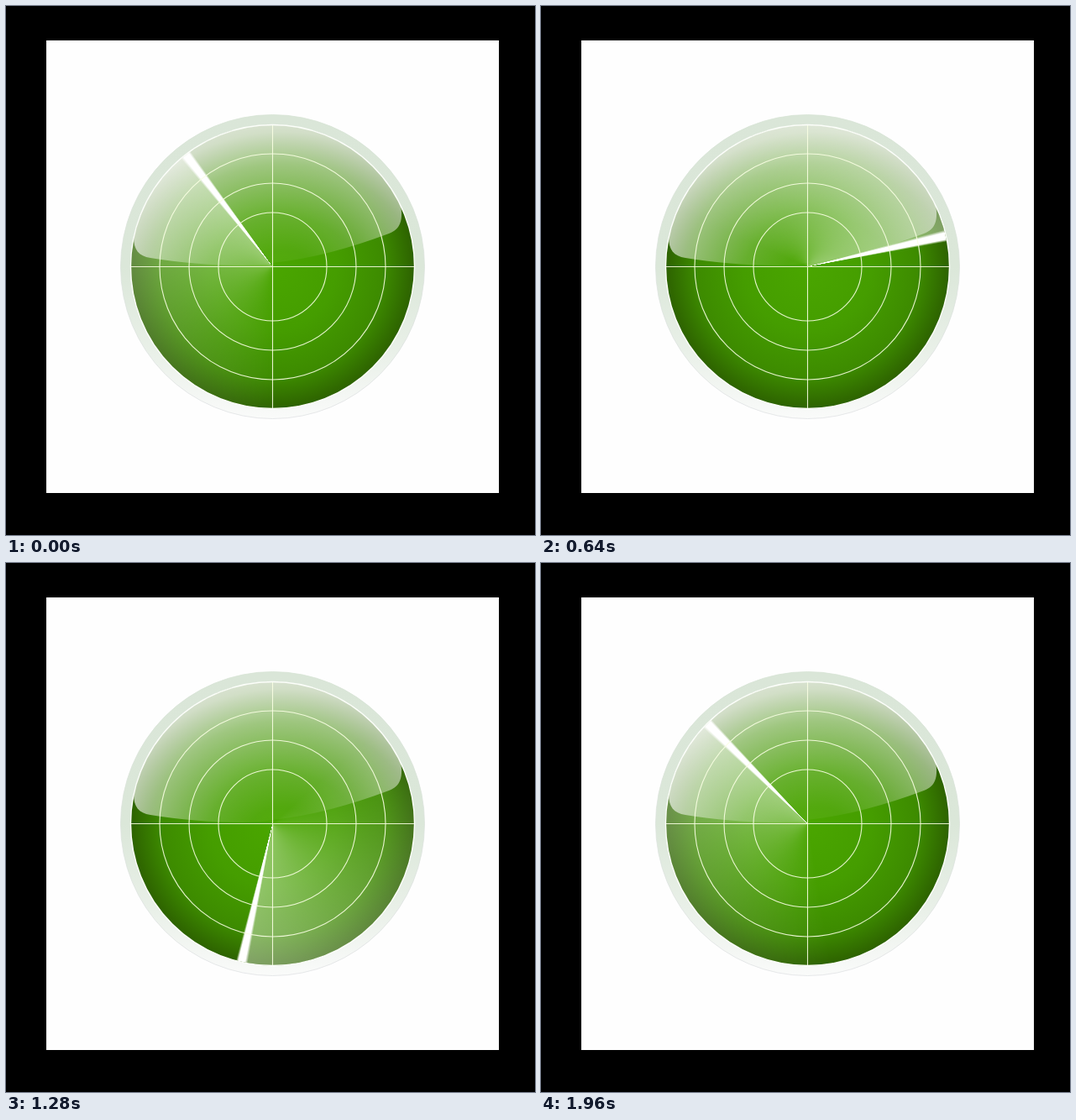
These frames come from a looping animation (630x630 px, 2 s). An HTML page with a canvas:

```html
<!DOCTYPE html>
<html>
<head>
<meta charset="utf-8">
<title>Radar</title>
<style>
html, body { margin: 0; width: 100%; height: 100%; overflow: hidden; background: #000; }
canvas { display: block; }
</style>
</head>
<body>
<canvas id="stage" width="630" height="630"></canvas>
<script>
const c = document.getElementById('stage').getContext('2d');
const CX = 317.5, CY = 310.5, R = 169;
const LOOP = 2000, STEP = 40, START = 322.3;
const rad = deg => deg * Math.PI / 180;
const white = a => `rgba(255,255,255,${a})`;

function stops(gradient, list) {
  list.forEach(([at, color]) => gradient.addColorStop(at, color));
  return gradient;
}

function circle(r) {
  c.beginPath();
  c.arc(CX, CY, r, 0, 2 * Math.PI);
}

const rim = stops(c.createLinearGradient(0, 129, 0, 492),
  [[0, '#dae6d8'], [.5, '#dbe7d9'], [.78, '#e9f0e8'], [.95, '#f6f8f6'], [1, '#fafbfa']]);
const rimLine = stops(c.createLinearGradient(0, 129, 0, 492),
  [[0, '#d6e3d4'], [1, '#e0e2e4']]);
const disc = stops(c.createRadialGradient(CX, CY, 0, CX, CY, R),
  [[0, '#4aa600'], [.45, '#459d00'], [.78, '#3d8b00'], [1, '#2d6200']]);
const shine = stops(c.createRadialGradient(0, 0, 0, 0, 0, 200),
  [[0, white(.03)], [.2, white(.06)], [.4, white(.18)], [.71, white(.5)], [.9, white(.78)], [1, white(.85)]]);

function drawDisc() {
  c.fillStyle = '#000';
  c.fillRect(0, 0, 630, 630);
  c.fillStyle = '#fefefe';
  c.fillRect(48, 41, 539, 539);
  circle(181);
  c.fillStyle = rim;
  c.fill();
  c.strokeStyle = rimLine;
  c.lineWidth = .8;
  c.stroke();
  circle(R);
  c.fillStyle = disc;
  c.fill();
}

function drawGloss() {
  c.save();
  c.beginPath();
  c.arc(CX, CY, R, Math.atan2(275 - CY, 152 - CX), Math.atan2(238 - CY, 470 - CX));
  c.bezierCurveTo(473, 254, 470, 266, 456, 271);
  c.bezierCurveTo(410, 288, 365, 301, 317, 306);
  c.bezierCurveTo(290, 311, 225, 309, 172, 300);
  c.bezierCurveTo(158, 298, 152, 290, 152, 275);
  c.translate(330, 330);
  c.scale(1.15, 1);
  c.fillStyle = shine;
  c.fill();
  c.restore();
}

// Sweep angles are clockwise from north; the tail trails behind the beam.
function drawSweep(angle) {
  const at = behind => (360 - behind) / 360;
  c.save();
  c.translate(CX, CY);
  c.rotate(rad(angle + 3));
  const sweep = stops(c.createConicGradient(-Math.PI / 2, 0, 0), [
    [0, white(0)], [at(148), white(0)], [at(105), white(.11)], [at(60), white(.24)],
    [at(5.6), white(.4)], [at(4.4), white(1)], [at(1.7), white(1)], [at(.7), white(0)], [1, white(0)]
  ]);
  c.beginPath();
  c.arc(0, 0, R - .5, 0, 2 * Math.PI);
  c.fillStyle = sweep;
  c.fill();
  c.restore();
}

function drawGrid() {
  c.strokeStyle = 'rgba(250,255,228,.9)';
  c.lineWidth = 1.1;
  for (const r of [64.5, 99.5, 134.5]) {
    circle(r);
    c.stroke();
  }
  c.beginPath();
  c.moveTo(CX, CY - R);
  c.lineTo(CX, CY + R);
  c.moveTo(CX - R, CY);
  c.lineTo(CX + R, CY);
  c.stroke();
  circle(R);
  c.strokeStyle = '#fcfefa';
  c.lineWidth = 1.4;
  c.stroke();
}

const begin = performance.now();
function draw() {
  const time = Math.max(0, performance.now() - begin) % LOOP;
  drawDisc();
  drawGloss();
  drawSweep(START + Math.floor(time / STEP) * 360 * STEP / LOOP);
  drawGrid();
  requestAnimationFrame(draw);
}
draw();
</script>
</body>
</html>
```
